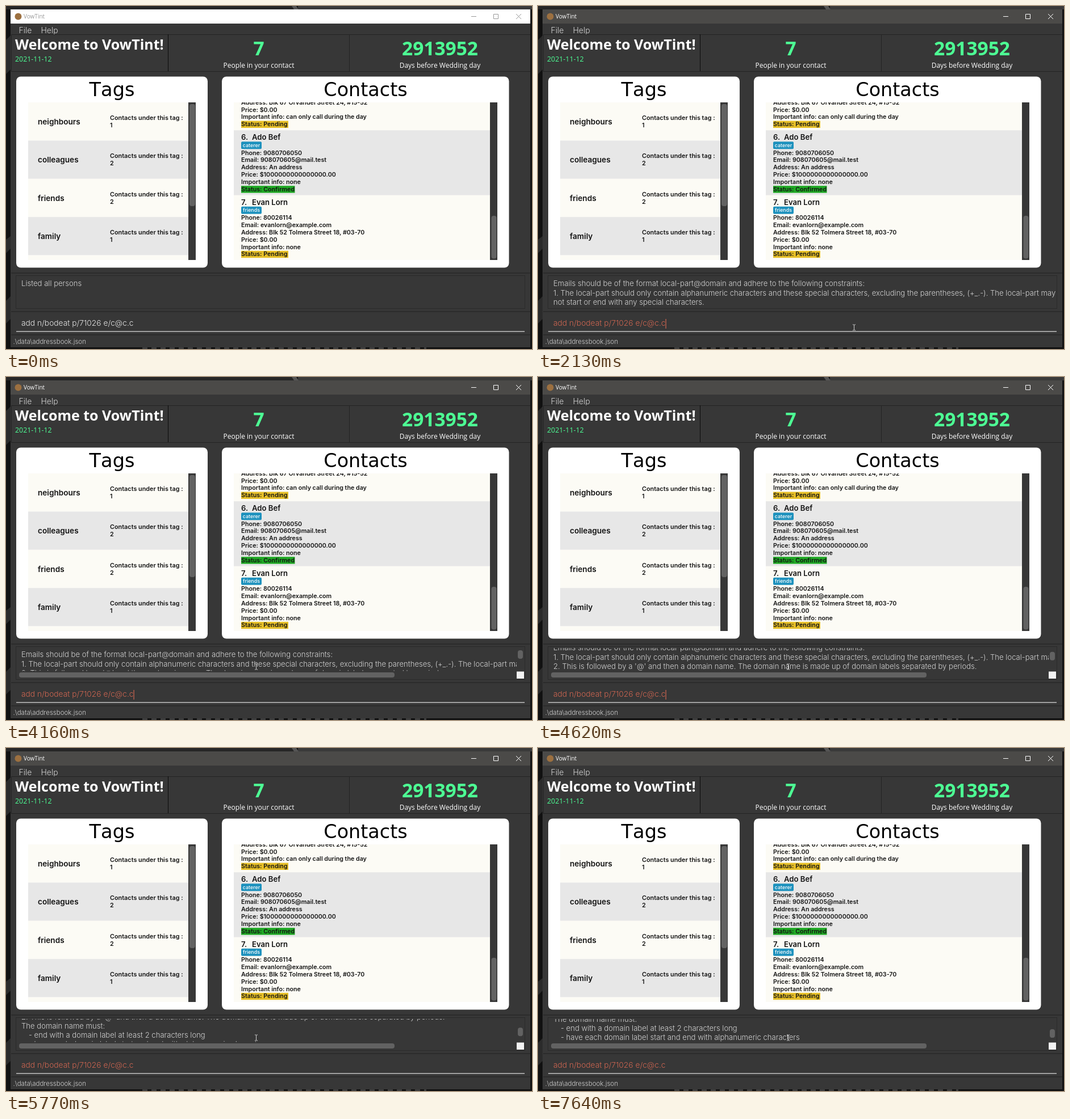
These frames come from a looping animation (926 by 605 pixels, 8000 ms). An HTML page:

```html
<!DOCTYPE html>
<html lang="en">
<head>
<meta charset="utf-8">
<title>VowTint</title>
<style>
html, body { margin: 0; width: 100%; height: 100%; overflow: hidden; background: #111; }
svg { display: block; width: 926px; height: 605px; }
text { font-family: Inter, sans-serif; }
.ui { font-family: "Open Sans", "Noto Sans", sans-serif; }
.heading { font-family: "DejaVu Sans", sans-serif; text-anchor: middle; font-kerning: none; }
.light { font-weight: 300; fill: #d2d2d2; }
.bold { font-weight: 600; fill: #141414; }
.mid { text-anchor: middle; }
</style>
</head>
<body>
<svg id="stage" viewBox="0 0 926 605"></svg>
<script>
const NS = 'http://www.w3.org/2000/svg';
const stage = document.getElementById('stage');
const LOOP = 8000, LINE = 16.1, TICK = 12;
const DARK = '#373737', EDGE = '#232323', THUMB = '#626262';
const CREAM = '#fcfbf5', GREY = '#e7e7e7', GREEN = '#4dff94';

function add(tag, attrs, parent = stage, content) {
  const node = document.createElementNS(NS, tag);
  set(node, attrs);
  if (content !== undefined) node.textContent = content;
  return parent.appendChild(node);
}
function set(node, attrs) {
  for (const key in attrs) node.setAttribute(key, attrs[key]);
}
const box = (x, y, width, height, fill, parent, rx = 0) =>
  add('rect', { x, y, width, height, fill, rx }, parent);
const label = (x, y, size, cls, content, parent, extra = {}) =>
  add('text', { x, y, 'font-size': size, class: cls, ...extra }, parent, content);
const group = (attrs = {}, parent) => add('g', attrs, parent);
const show = (node, on) => node.setAttribute('visibility', on ? 'visible' : 'hidden');

function clip(id, x, y, width, height) {
  box(x, y, width, height, '#000', add('clipPath', { id }));
  return group({ 'clip-path': `url(#${id})` });
}

// Desktop showing around the window
box(0, 0, 926, 605, '#111');
box(0, 0, 510, 6, '#262626');
box(514, 0, 412, 6, '#3a3a3a');
add('path', { d: 'M503 0h8l4 6h-8z', fill: '#555' });
add('path', { d: 'M0 60l8 -8v60l-8 8zM0 412l8 -6v22l-8 8zM0 520l8 -8v40l-8 8z', fill: '#2b2b2b' });
add('path', { d: 'M240 603.5H740', stroke: '#3c3c3c', 'stroke-width': 3, 'stroke-dasharray': '9 7' });

// Window frame and title bar
box(8, 6, 915, 596, DARK);
const titleBar = box(8, 6, 915, 25, '#fff');
add('circle', { cx: 21.5, cy: 18.5, r: 6, fill: '#9c7040' });
const title = label(31, 22, 10, 'ui', 'VowTint');
const buttons = add('path', {
  d: 'M819 18.5h9M858.5 14.5h8v8h-8zM898 14l9 9M907 14l-9 9', fill: 'none'
});

// Menu and header
label(22.5, 48, 14, 'light', 'File');
label(61.5, 48, 14, 'light', 'Help');
add('path', {
  d: 'M9 50.5H923M9 115.5H923M285.5 50V115M604.5 50V115M9.5 50V115', stroke: EDGE, fill: 'none'
});
add('path', { d: 'M285.5 50V115', stroke: '#0c0c0c' });
label(16, 77, 25, 'ui', 'Welcome to VowTint!', stage, { 'font-weight': 700, fill: '#fff' });
label(16, 98, 12.4, 'ui', '2021-11-12', stage, { fill: GREEN });
for (const [x, number, caption] of [
  [445, '7', 'People in your contact'],
  [764, '2913952', 'Days before Wedding day']
]) {
  label(x, 87, 33.5, 'ui mid', number, stage, { 'font-weight': 700, fill: GREEN });
  label(x, 109, 12, 'ui mid', caption, stage, { fill: '#fff' });
}

// Tags panel
box(18, 124.5, 337, 337, '#fff', stage, 8);
label(186.5, 158.5, 33.6, 'heading', 'Tags');
const tagList = clip('tagClip', 39, 170, 295, 278);
[['neighbours', 1], ['colleagues', 2], ['friends', 2], ['family', 1], ['', '']].forEach(([name, count], i) => {
  const y = 170 + 67.4 * i;
  box(39, y, 282, 67.4, i % 2 ? GREY : CREAM, tagList);
  if (!name) return;
  label(56, y + 39, 13.6, 'bold', name, tagList);
  label(183, y + 31, 10.85, 'bold', 'Contacts under this tag :', tagList);
  label(183, y + 44, 10.85, 'bold', count, tagList);
});
box(321, 170, 13, 278, DARK, tagList);
box(323, 173, 10, 180, THUMB, tagList, 4);

// Contacts panel
box(380, 124.5, 505.5, 337, '#fff', stage, 8);
label(633, 158.5, 33.4, 'heading', 'Contacts');
const contactList = clip('contactClip', 401, 170, 464, 278);

function contact(top, fill, name, tag, lines, status) {
  const confirmed = status === 'Confirmed';
  box(401, top, 451, 114.6, fill, contactList);
  label(414, top + 16.8, 13.1, 'bold', name[0], contactList);
  label(433, top + 16.8, 13.1, 'bold', name[1], contactList);
  box(414, top + 20, 36, 13, '#1d91bd', contactList, 2);
  label(432, top + 29.6, 8.9, 'mid', tag, contactList, { fill: '#fff', 'font-weight': 500 });
  box(414, top + 98, confirmed ? 94.5 : 83, 12.4, confirmed ? '#1fa824' : '#e6bf28', contactList);
  [...lines, 'Status: ' + status].forEach((line, i) =>
    label(414, top + 43.3 + 12.87 * i, 10.7, 'bold', line, contactList));
}
contact(104.6, CREAM, ['5.', ''], 'friends', [
  '', '', 'Address: Blk 67 Orvandel Street 24, #15-52', 'Price: $0.00',
  'Important info: can only call during the day'
], 'Pending');
contact(219.2, GREY, ['6.', 'Ado Bef'], 'caterer', [
  'Phone: 9080706050', 'Email: 908070605@mail.test', 'Address: An address',
  'Price: $1000000000000000.00', 'Important info: none'
], 'Confirmed');
contact(333.8, CREAM, ['7.', 'Evan Lorn'], 'friends', [
  'Phone: 80026114', 'Email: evanlorn@example.com', 'Address: Blk 52 Tolmera Street 18, #03-70',
  'Price: $0.00', 'Important info: none'
], 'Pending');
box(852, 170, 13, 278, DARK, contactList);
box(854.5, 370, 9, 75.5, THUMB, contactList, 4);

// Result box
add('path', { d: 'M9 471H923M9 539H923M9 580H923', stroke: '#2c2c2c', 'stroke-width': 2 });
add('rect', { x: 17.5, y: 475.5, width: 896, height: 58, fill: 'none', stroke: '#2a2a2a' });
const message = (x, row, content, parent) =>
  label(x, 494.4 + LINE * row, 13.1, 'light', content, parent);
const emailRule = 'Emails should be of the format local-part@domain and adhere to the following constraints:';
const localRule = '1. The local-part should only contain alphanumeric characters and these special characters, ' +
  'excluding the parentheses, (+_.-). The local-part may';
const localRest = 'not start or end with any special characters.';

const listed = message(27, 0, 'Listed all persons');
const wrapped = group();
[emailRule, localRule, localRest].forEach((line, i) => message(27, i, line, wrapped));

const scrollView = group();
const textPane = clip('textClip', 20, 478, 879, 40.5);
const scrolled = group({}, textPane);
[
  emailRule,
  localRule + ' ' + localRest,
  "2. This is followed by a '@' and then a domain name. The domain name is made up of domain labels separated by periods.",
  'The domain name must:',
  '- end with a domain label at least 2 characters long',
  '- have each domain label start and end with alphanumeric characters',
  '- have each domain label consist of alphanumeric characters, separated only by hyphens, if any.'
].forEach((line, i) => message(i > 3 ? 40 : 27, i, line, scrolled));
box(23, 521, 661, 9, THUMB, scrollView, 4);
box(899, 519.5, 13, 12.5, '#f2f2f2', scrollView);
const thumb = box(901, 482, 9, 15, THUMB, scrollView, 4);

// Command field and footer
const command = label(27, 564, 13.75, '', 'add n/bodeat p/71026 e/c@c.c', stage, { 'font-weight': 300 });
const caret = box(224.5, 552, 1.2, 17, '#d06651');
box(18, 573.5, 895, 1.2, '#e4e4e4');
label(12.5, 596.4, 11.5, 'light', '.\\data\\addressbook.json');

// Pointer
const pointer = group();
const halo = add('circle', { r: 10, fill: '#aaa015' }, pointer);
const beam = add('path', {
  d: 'M-2.5 -5H-.7L0 -4.3L.7 -5H2.5M0 -4.3V4.3M-2.5 5H-.7L0 4.3L.7 5H2.5',
  fill: 'none', stroke: '#d0d0d0', 'stroke-width': 1
}, pointer);
const arrow = add('path', { d: 'M0 0V12L3 9.3L5 13.5L6.8 12.7L5 8.7H8.8Z', fill: '#fff', stroke: '#000', 'stroke-width': .6 }, pointer);

// Times at which the caret flips, starting hidden
const blinks = [910, 1370, 1870, 2640, 3150, 3660, 4160, 4670, 5110, 5620, 6120, 6630, 7130, 7640];
// [time, wheel ticks scrolled]
const wheel = [[0, 0], [4620, 1], [4670, 2], [5110, 3], [5770, 4], [6270, 6], [6780, 7], [7540, 6], [7640, 5]];

// Progress of a move made in equal hard steps, eased out
function stepped(t, start, end, steps) {
  const k = Math.floor((t - start) / ((end - start) / (steps - 1)) + 1.001);
  const p = Math.min(1, Math.max(0, k / steps));
  return 1 - (1 - p) ** 2;
}

function pointerAt(t) {
  if (t < 2580) {
    const p = stepped(t, 190, 660, 9);
    return [870 - 313.5 * p, 617 - 50 * p];
  }
  const p = stepped(t, 2580, 3150, 11);
  return [556.5 - 116 * p, 567 - 56 * p];
}

function render(t) {
  const active = t >= 810, failed = t >= 2130, scrolling = t >= 2180;
  titleBar.setAttribute('fill', active ? '#4b4a48' : '#fff');
  title.setAttribute('fill', active ? '#fff' : '#999');
  buttons.setAttribute('stroke', active ? '#fff' : '#999');

  show(listed, !failed);
  show(wrapped, failed && !scrolling);
  show(scrollView, scrolling);
  show(textPane, scrolling);
  const offset = TICK * wheel.filter(([time]) => time <= t).pop()[1];
  scrolled.setAttribute('transform', `translate(0 ${-offset})`);
  thumb.setAttribute('y', 482 + offset * .235);

  command.setAttribute('fill', failed ? '#d06651' : '#e8e8e8');
  caret.setAttribute('fill', failed ? '#d06651' : '#e8e8e8');
  show(caret, blinks.filter(time => time <= t).length % 2 === 1);

  const [x, y] = pointerAt(t), overField = y < 577;
  pointer.setAttribute('transform', `translate(${x.toFixed(1)} ${y.toFixed(1)})`);
  show(halo, t >= 810 && t < 910);
  show(beam, t >= 190 && overField);
  show(arrow, t >= 190 && !overField);
}

const started = performance.now();
function tick() {
  render((performance.now() - started) % LOOP);
  requestAnimationFrame(tick);
}
render(0);
requestAnimationFrame(tick);
</script>
</body>
</html>
```
